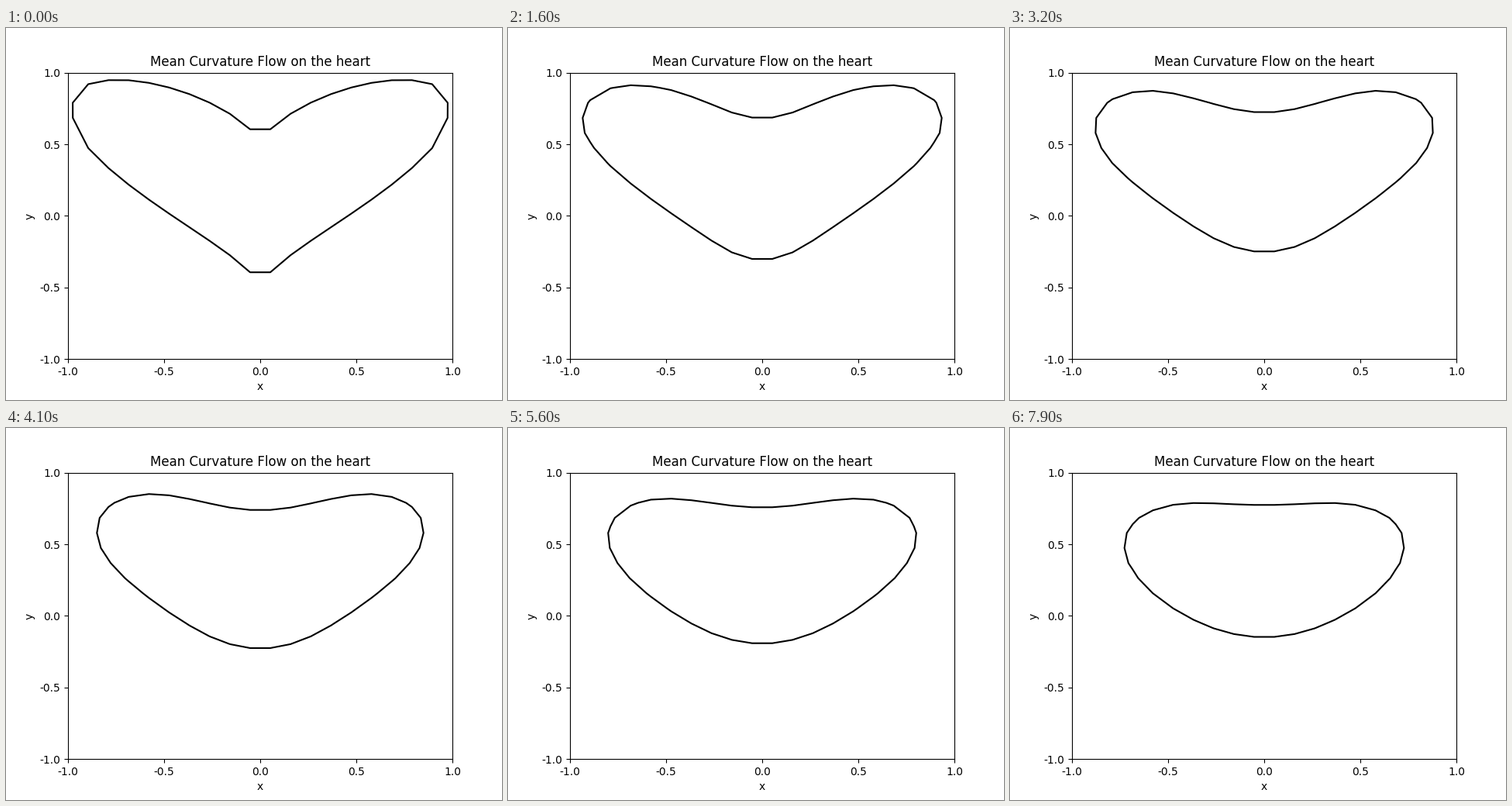
A matplotlib script that plays this animation: 640 px wide and 480 px high, repeating every 8000 ms.

```python
import numpy as np
import matplotlib.pyplot as plt
from matplotlib.animation import FuncAnimation

plt.rcParams["axes.unicode_minus"] = False

N = 20          # grid points per side
DT = 0.001      # flow time per frame
FRAMES = 80
INTERVAL = 100

axis = np.linspace(-1, 1, N)
H = axis[1] - axis[0]
X, Y = np.meshgrid(axis, axis)


def heart(x, y):
    """Implicit heart: negative inside, positive outside."""
    return np.abs(y - 0.75 * np.abs(x) ** (2 / 3)) - 0.5 * np.sqrt(1 - x**2)


def shift(f, dx, dy):
    """Value of f at the neighbour (dx, dy) on a periodic grid."""
    return np.roll(f, (-dy, -dx), axis=(0, 1))


def flow_step(f):
    """One explicit step of f_t = curvature * |grad f|."""
    e, w, n, s = shift(f, 1, 0), shift(f, -1, 0), shift(f, 0, 1), shift(f, 0, -1)
    fx, fy = (e - w) / (2 * H), (n - s) / (2 * H)
    fxx, fyy = (e - 2 * f + w) / H**2, (n - 2 * f + s) / H**2
    fxy = (shift(f, 1, 1) - shift(f, 1, -1)
           - shift(f, -1, 1) + shift(f, -1, -1)) / (4 * H**2)
    speed = fxx * fy**2 - 2 * fx * fy * fxy + fyy * fx**2
    return f + DT * speed / (fx**2 + fy**2 + 1e-10)


fields = [heart(X, Y)]
while len(fields) < FRAMES:
    fields.append(flow_step(fields[-1]))

fig, ax = plt.subplots(figsize=(6.4, 4.8), dpi=100)
ax.set(xlim=(-1, 1), ylim=(-1, 1), xlabel="x", ylabel="y",
       title="Mean Curvature Flow on the heart")
ticks = np.linspace(-1, 1, 5)
ax.set_xticks(ticks)
ax.set_yticks(ticks)


def draw(i):
    for old in list(ax.collections):
        old.remove()
    ax.contour(X, Y, fields[i], levels=[0], colors="black", linewidths=1.5)
    return list(ax.collections)


anim = FuncAnimation(fig, draw, frames=FRAMES, interval=INTERVAL,
                     repeat=True, repeat_delay=0, blit=False)
plt.show()
```
